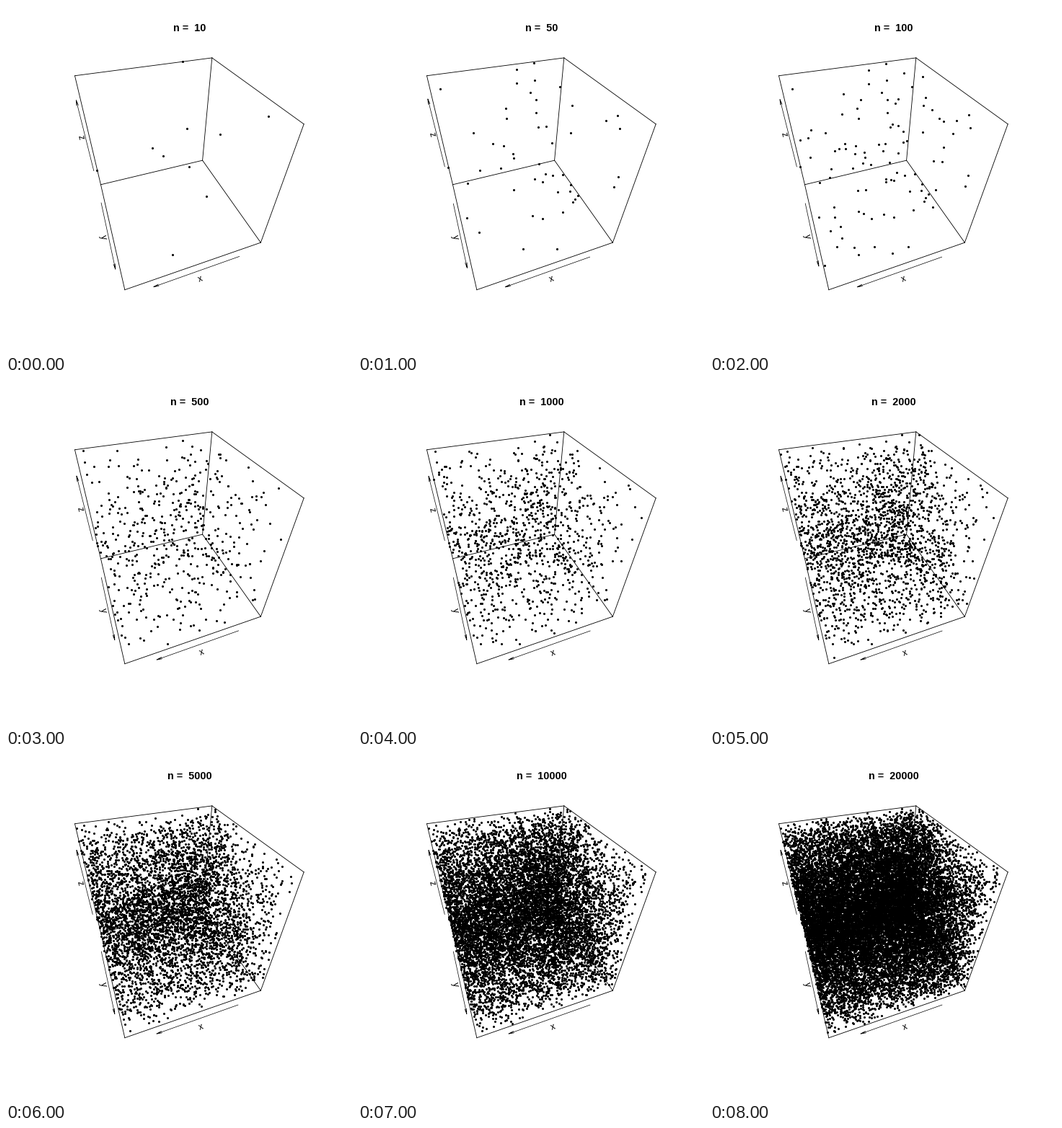
Write a matplotlib script that moves like this. It is 480x480 px and loops after 9 s.

```python
from itertools import combinations, product

import numpy as np
import matplotlib.pyplot as plt
from matplotlib.animation import FuncAnimation

SIZE, DPI = 480, 100
PX = 72 / DPI  # points per pixel
COUNTS = [10, 50, 100, 500, 1000, 2000, 5000, 10000, 20000]

# Perspective camera
THETA, PHI = np.radians(160), np.radians(40)
DIST = 2 + np.sqrt(3)
SCALE, CX, CY = 374.55, 230.8, 218.2


def project(p):
    """Map points of the cube [-1, 1]^3 to stage pixels."""
    x, y, z = np.asarray(p, float).T
    side = np.cos(THETA) * x + np.sin(THETA) * y
    back = np.cos(THETA) * y - np.sin(THETA) * x
    up = z * np.cos(PHI) + back * np.sin(PHI)
    near = z * np.sin(PHI) - back * np.cos(PHI)
    k = SCALE / (DIST - near)
    return np.column_stack([CX + side * k, CY - up * k])


def normalise(v, lo, hi):
    """Rescale the range lo..hi to -1..1."""
    return 2 * (v - lo) / (hi - lo) - 1


# Uniform points; each step shows more of the same sequence.
# The few points of the first step span the range LOW..HIGH.
LOW, HIGH = np.array([.02, .02, .065]), np.array([.97, .965, .967])
sample = np.random.default_rng(7).random((COUNTS[-1], 3))
first = sample[:COUNTS[0]]
unit = (normalise(first, first.min(axis=0), first.max(axis=0)) + 1) / 2
sample[:COUNTS[0]] = LOW + unit * (HIGH - LOW)

# Cube edge beside each axis; it is also the outward direction
AXES = {"x": (0, 1, -1), "y": (1, 0, -1), "z": (1, -1, 0)}
ARROW_GAP, LABEL_GAP = 0.06, 0.14
HEAD, HEAD_ANGLE = 7.2, np.radians(10)

fig = plt.figure(figsize=(SIZE / DPI, SIZE / DPI), dpi=DPI, facecolor="white")
ax = fig.add_axes([0, 0, 1, 1])
ax.set_xlim(0, SIZE)
ax.set_ylim(SIZE, 0)
ax.axis("off")

# All edges of the box except the three meeting at the nearest corner
corners = [c for c in product((-1, 1), repeat=3) if c != (1, 1, 1)]
for a, b in combinations(corners, 2):
    if sum(u != v for u, v in zip(a, b)) == 1:
        ax.plot(*project([a, b]).T, color="black", lw=0.85 * PX, zorder=1)

dots, = ax.plot([], [], "o", color="black", ms=3.1 * PX, mew=0, zorder=3)
title = ax.text(254.4, 35, "", ha="center", va="baseline", weight="bold",
                family="Liberation Sans", size=14.4 * PX)
arrows = [ax.plot([], [], color="black", lw=0.7 * PX, zorder=2,
                  solid_joinstyle="round")[0] for _ in AXES]
labels = [ax.text(0, 0, name, ha="center", va="center",
                  family="Liberation Sans", size=12 * PX) for name in AXES]


def arrow_path(a, b):
    """Shaft from a to b and an open head at b."""
    back = np.arctan2(*(a - b)[::-1])
    barbs = [b + HEAD * np.array([np.cos(t), np.sin(t)])
             for t in (back - HEAD_ANGLE, back + HEAD_ANGLE)]
    return np.array([a, b, (np.nan, np.nan), barbs[0], b, barbs[1]])


def draw(i):
    pts = sample[:COUNTS[i]]
    lo, hi = pts.min(axis=0), pts.max(axis=0)
    dots.set_data(*project(normalise(pts, lo, hi)).T)
    title.set_text(f"n =  {COUNTS[i]}")

    # Arrows run from 0.2 to 0.8 in data units
    start, end = normalise(0.2, lo, hi), normalise(0.8, lo, hi)
    for k, (edge, arrow, label) in enumerate(zip(AXES.values(), arrows, labels)):
        ends = np.tile(np.multiply(edge, 1 + ARROW_GAP), (2, 1))
        ends[:, k] = start[k], end[k]
        a, b = project(ends)
        arrow.set_data(*arrow_path(a, b).T)

        spot = np.multiply(edge, 1 + LABEL_GAP)
        spot[k] = (start[k] + end[k]) / 2
        label.set_position(project([spot])[0])
        dx, dy = b - a if b[0] > a[0] else a - b
        label.set_rotation(np.degrees(np.arctan2(-dy, dx)))
    return [dots, title, *arrows, *labels]


anim = FuncAnimation(fig, draw, frames=len(COUNTS), interval=1000,
                     repeat=True, repeat_delay=0, blit=False)
plt.show()
```
